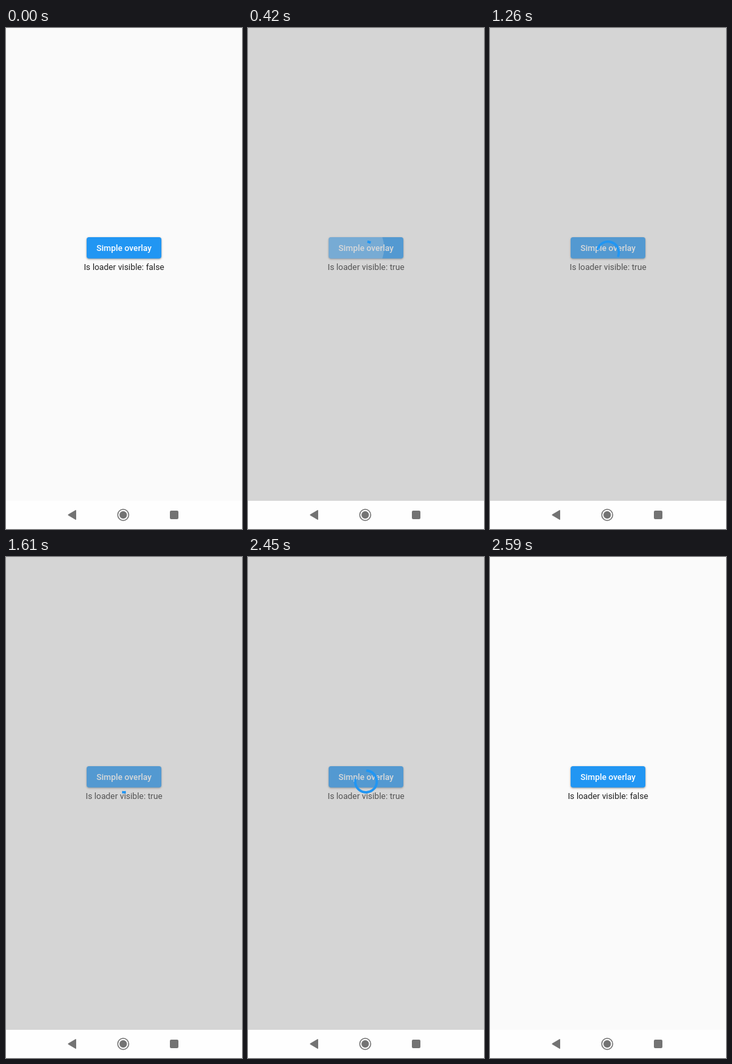
An HTML page with a canvas for the animation above (2.66 s loop, 360 by 764 pixels).

```html
<!DOCTYPE html>
<html lang="en">
<head>
<meta charset="utf-8">
<title>Simple overlay</title>
<style>
  html, body { margin: 0; width: 100%; height: 100%; overflow: hidden; background: #fafafa; }
  canvas { display: block; width: 360px; height: 764px; }
</style>
</head>
<body>
<canvas id="stage"></canvas>
<script>
const W = 360, H = 764, NAV_Y = 721;
const LOOP = 2660, STEP = 70;
const PRESS = 350, SHOW = 420, HIDE = 2520;
const BLUE = '#2196f3', TAU = Math.PI * 2;
const BUTTON = [123, 319, 114, 32.4, 3.7];

const canvas = document.getElementById('stage');
const ctx = canvas.getContext('2d');
const dpr = window.devicePixelRatio || 1;
canvas.width = W * dpr;
canvas.height = H * dpr;
ctx.scale(dpr, dpr);

const clamp = v => Math.min(1, Math.max(0, v));

// cubic-bezier(.4, 0, .2, 1)
function ease(x) {
  x = clamp(x);
  let lo = 0, hi = 1;
  for (let i = 0; i < 24; i++) {
    const s = (lo + hi) / 2, r = 1 - s;
    if (1.2 * r * r * s + 0.6 * r * s * s + s * s * s < x) lo = s; else hi = s;
  }
  return lo * lo * (3 - 2 * lo);
}

function disc(x, y, r) {
  ctx.beginPath();
  ctx.arc(x, y, r, 0, TAU);
}

function roundBox(x, y, w, h, r) {
  ctx.beginPath();
  ctx.roundRect(x, y, w, h, r);
}

function label(text, y, weight, color) {
  ctx.font = weight + ' 12.83px Roboto, sans-serif';
  ctx.textAlign = 'center';
  ctx.fillStyle = color;
  ctx.fillText(text, W / 2, y);
}

function drawRipple(t) {
  const age = t - PRESS;
  const alpha = Math.min(0.27, 0.1 + age * 0.003) * clamp(1 - (age - 270) / 150);
  if (age < 0 || alpha <= 0) return;
  ctx.save();
  roundBox(...BUTTON);
  ctx.clip();
  if (age < STEP) {
    ctx.fillStyle = 'rgba(255,255,255,.04)';
    ctx.fill();
  }
  disc(Math.min(180, 142 + age * 0.19), 335.3, 18 + age * 0.49);
  ctx.fillStyle = `rgba(255,255,255,${alpha})`;
  ctx.fill();
  ctx.restore();
}

function drawButton(t) {
  ctx.save();
  ctx.shadowColor = 'rgba(0,0,0,.42)';
  ctx.shadowBlur = 3 * dpr;
  ctx.shadowOffsetY = dpr;
  roundBox(...BUTTON);
  ctx.fillStyle = BLUE;
  ctx.fill();
  ctx.restore();
  drawRipple(t);
  label('Simple overlay', 339.8, 500, '#fff');
}

function drawSpinner(ms) {
  const cycle = ms / 1333 % 1;
  const head = ease(cycle * 2) * 0.75;
  const tail = ease(cycle * 2 - 1) * 0.75;
  const turn = ms / 2222 + cycle / 4 - 0.25;
  const start = (turn + tail) * TAU;
  ctx.beginPath();
  ctx.arc(180, 342.3, 16.5, start, start + Math.max((head - tail) * TAU, 0.001));
  ctx.strokeStyle = BLUE;
  ctx.lineWidth = 3.67;
  ctx.lineCap = 'square';
  ctx.stroke();
}

function drawNav() {
  ctx.fillStyle = '#fefefe';
  ctx.fillRect(0, NAV_Y, W, H - NAV_Y);
  ctx.fillStyle = ctx.strokeStyle = '#737373';
  ctx.lineJoin = 'round';
  ctx.lineWidth = 1.5;
  ctx.beginPath();
  ctx.moveTo(95.3, 742.5);
  ctx.lineTo(106.3, 735.8);
  ctx.lineTo(106.3, 749.2);
  ctx.closePath();
  ctx.fill();
  ctx.stroke();
  disc(178.8, 742.5, 8.4);
  ctx.stroke();
  disc(178.8, 742.5, 5.7);
  ctx.fill();
  roundBox(250, 736, 13, 13, 2);
  ctx.fill();
}

function draw(t) {
  const loading = t >= SHOW && t < HIDE;
  ctx.fillStyle = '#fafafa';
  ctx.fillRect(0, 0, W, H);
  drawButton(t);
  label('Is loader visible: ' + loading, 369, 400, '#212121');
  if (loading) {
    ctx.fillStyle = 'rgba(158,158,158,.4)';
    ctx.fillRect(0, 0, W, NAV_Y);
    drawSpinner(60 + (t - SHOW) / 1.05);
  }
  drawNav();
}

const begin = performance.now();
function tick() {
  const t = (performance.now() - begin) % LOOP;
  draw(Math.floor(t / STEP) * STEP);
  requestAnimationFrame(tick);
}
tick();
</script>
</body>
</html>
```
